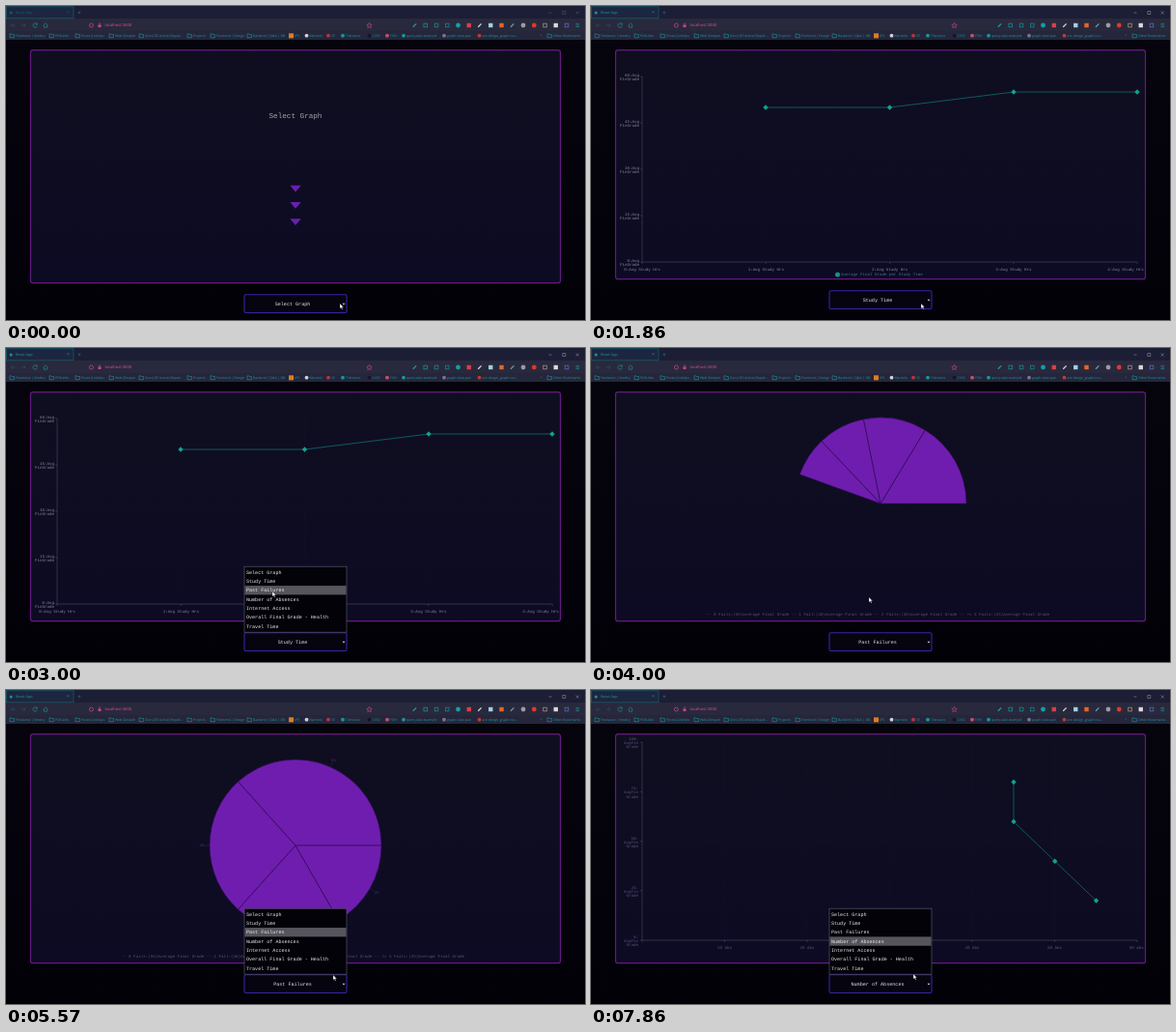
An HTML page that plays this animation: 600 px wide and 325 px high, repeating every 8000 ms.

```html
<!DOCTYPE html>
<html lang="en">
<head>
<meta charset="utf-8">
<title>Graph selector</title>
<style>
html, body { margin: 0; width: 100%; height: 100%; overflow: hidden; background: #030209; }
svg { display: block; width: 100%; height: 100%; }
text { white-space: pre; text-rendering: geometricPrecision; }
.mono { font-family: "Liberation Mono", "Courier New", monospace; }
.sans { font-family: "Open Sans", "Noto Sans", sans-serif; }
.grid { stroke: #1b1830; stroke-width: .4; stroke-dasharray: 1 1; fill: none; }
.axis { stroke: #4a4960; stroke-width: .6; fill: none; }
.line { stroke: #117a76; stroke-width: .7; fill: none; }
.icon { fill: none; stroke: #1c9a9e; stroke-width: .6; }
</style>
</head>
<body>
<svg id="stage" viewBox="0 0 600 325" preserveAspectRatio="none"></svg>
<script>
const FPS = 7, FRAMES = 56;
const OPTIONS = ['Select Graph', 'Study Time', 'Past Failures', 'Number of Absences',
  'Internet Access', 'Overall Final Grade - Health', 'Travel Time'];
const ROW = 9.33, LIST_TOP = 227.4;

const text = (x, y, str, size, fill, anchor = 'middle', font = 'mono') =>
  `<text class="${font}" x="${x}" y="${y + size * .3}" font-size="${size}" fill="${fill}" text-anchor="${anchor}">${str.replace(/&/g, '&amp;').replace(/>/g, '&gt;')}</text>`;
const rect = (x, y, w, h, attrs) => `<rect x="${x}" y="${y}" width="${w}" height="${h}" ${attrs}/>`;
const dot = (x, y, r, fill) => `<circle cx="${x}" cy="${y}" r="${r}" fill="${fill}"/>`;
const path = (d, attrs) => `<path d="${d}" ${attrs}/>`;
const range = n => [...Array(n).keys()];

function browser() {
  const teal = '#1f9a9f', pink = '#d24a8c';
  const label = (x, y, str, size = 3.45) => text(x, y, str, size, teal, 'start', 'sans');
  const folder = x => path(`M${x} 28.8h1.6l.6.7h2.2v3.2h-4.4z`, 'class="icon"');
  const folders = [[4, 'Freelance | Vendry'], [45, 'PCBuilds'], [72, 'Poses|LinkUps'], [107, 'Web|DevJam'],
    [138, 'Docs|DS Active|Ripple...'], [188, 'Projects'], [212, 'Frontend | Design'], [250, 'Backend | Q&A | DB'], [561, 'Other Bookmarks']];
  const links = [[295.5, 'VPS', '#e07a20'], [311.5, 'Marnelo', '#d0d0d8'], [334, 'SE', '#b8363c'], [349, 'Tilerow.io', '#14989a'],
    [376.5, 'CVCC', '#15152a'], [395, 'FISH', '#c8506c'], [412, 'query.take.example', '#14989a'],
    [454, 'graph-view-pan', '#77778c'], [490.5, 'ant design_graph-rou...', '#b83e32']];
  const tools = ['#1f9a9f', '#189092', '#1c868a', '#18808a', '#14a0a2', '#d84048', '#d8d8de', '#a0d0e0',
    '#e0682a', '#60a0b0', '#9a9aa4', '#e0382c', '#a09080', '#d8d8de', '#5a68b8', '#1f9a9f'];
  return rect(0, 0, 600, 35, 'fill="#25263b"') + rect(0, 0, 600, 13, 'fill="#1c1e36"')
    + rect(0, 13, 600, 13, 'fill="#29293e"')
    + rect(.4, .8, 69.6, 12, 'fill="#1d2640" stroke="#146a72" stroke-width=".6"')
    + '<g id="titlebar">' + dot(5.2, 7, 1.5, '#23909a') + label(10, 7, 'React App', 3.75)
    + text(64.5, 6.8, '×', 5, teal, 'middle', 'sans')
    + path('M562.5 7h3M576.8 5.5h3v3h-3zM590.7 5.5l3 3m0-3l-3 3', 'fill="none" stroke="#a0a0ac" stroke-width=".5"') + '</g>'
    + text(76, 6.8, '+', 6, teal, 'middle', 'sans')
    + path('M9.5 20h-4m1.7-1.7L5.5 20l1.7 1.7M16 20h4m-1.7-1.7L20 20l-1.7 1.7', 'class="icon" opacity=".4"')
    + path('M32 18.7a2.2 2.2 0 1 0 .3 2M32.3 17.6v1.6h-1.7M38.6 20l2.4-2.2 2.4 2.2M39.4 19.8v2.4h3.2v-2.4', 'class="icon"')
    + `<circle cx="88.4" cy="20" r="2" fill="none" stroke="${pink}" stroke-width=".7"/>`
    + rect(95.5, 19.5, 3, 2.4, `fill="${pink}"`) + path('M96.2 19.5v-1a.8.8 0 0 1 1.6 0v1', `fill="none" stroke="${pink}" stroke-width=".5"`)
    + text(102.5, 20, 'localhost:3000', 4.1, '#e0508f', 'start', 'sans')
    + path('M376.5 17.4l.8 1.8 1.9.2-1.4 1.3.4 1.9-1.7-1-1.7 1 .4-1.9-1.4-1.3 1.9-.2z', `fill="none" stroke="${pink}" stroke-width=".6"`)
    + tools.map((c, i) => {
        const x = 423.5 + i * 11.25;
        return i === 0 || i === 6 || i === 9 ? path(`M${x - 1.8} 21.8l3.4-3.4`, `stroke="${c}" stroke-width="1.3"`)
          : i === 4 || i === 10 || i === 11 ? dot(x, 20, 2.4, c)
          : i === 5 || i === 7 || i === 8 || i === 13 ? rect(x - 2.2, 17.8, 4.4, 4.4, `fill="${c}"`)
          : i === 15 ? path(`M${x - 1.8} 18.4h3.6m-3.6 1.6h3.6m-3.6 1.6h3.6`, 'class="icon"')
          : rect(x - 1.8, 18.2, 3.6, 3.6, `fill="none" stroke="${c}" stroke-width=".8"`);
      }).join('')
    + folders.map(([x, s]) => folder(x) + label(x + 6, 30.7, s)).join('')
    + links.map(([x, s, c], i) => (i ? dot(x, 30.7, 1.9, c) : rect(293, 28.3, 5, 5, `fill="${c}"`)) + label(x + 3, 30.7, s)).join('')
    + label(553.5, 30.3, '»');
}

const marker = ([x, y]) => path(`M${x - 2.7} ${y}L${x} ${y - 2.7}L${x + 2.7} ${y}L${x} ${y + 2.7}Z`, 'fill="#11a192"');

// xs, ys: tick positions; the first x and last y form the axes
function lineChart(id, xs, ys, points, labels) {
  const [left, right, top, bottom] = [xs[0], xs.at(-1), ys[0], ys.at(-1)];
  return `<g id="${id}">`
    + path(ys.map(y => `M${left} ${y}H${right}`).join('') + xs.map(x => `M${x} ${top}V${bottom}`).join(''), 'class="grid"')
    + path(`M${left} ${top}V${bottom}H${right}` + ys.map(y => `M${left - 2} ${y}h2`).join('') + xs.map(x => `M${x} ${bottom}v2`).join(''), 'class="axis"')
    + labels + path('M' + points.join('L'), 'class="line" pathLength="100"')
    + `<g class="dots">${points.map(marker).join('')}</g></g>`;
}

function studyChart() {
  const xs = range(5).map(i => 53 + i * 128.3), ys = range(5).map(i => 73 + i * 48);
  const gray = '#85859a';
  const labels = ys.map((y, i) => text(50, y - 1.2, `${60 - i * 15}:Avg`, 4.15, gray, 'end') + text(50, y + 3, 'FinGrade', 4.15, gray, 'end')).join('')
    + xs.map((x, i) => text(Math.min(x, 554), 272.3, `${i}:Avg Study Hrs`, 4.15, gray)).join('')
    + dot(255.5, 278, 2.5, '#129386') + text(259, 278, 'Average Final Grade per Study Time', 4.17, '#46708c', 'start');
  return lineChart('study', xs, ys, [[181, 105], [309.5, 105], [438, 89], [566, 89]], labels);
}

function absenceChart() {
  const xs = range(7).map(i => 53 + i * 85.5), ys = range(5).map(i => 54 + i * 51.25);
  const dim = '#56547a';
  const labels = ys.map((y, i) => [`${100 - i * 25}:`, 'AvgFin', 'Grade'].map((s, k) => text(49, y - 3.2 + k * 4.2, s, 4.15, dim, 'end')).join('')).join('')
    + xs.slice(1).map((x, i) => text(x - (i === 5 ? .8 : 0), 266.3, `${(i + 1) * 10} Abs`, 4.15, dim)).join('')
    + dot(262, 271.3, 2.5, '#129386') + text(265.3, 271.3, 'Avg Grade vs Num of Absences', 4.3, '#3b6a84', 'start');
  return lineChart('absence', xs, ys, [[438, 95.2], [438, 136.2], [480.7, 177.2], [523.5, 218]], labels);
}

const GRADES = [55, 40, 30, 25], TOTAL = 150, CENTER = [300, 161], RADIUS = 89;
const polar = (turn, r) => {
  const a = turn * 2 * Math.PI;
  return [CENTER[0] + r * Math.cos(a), CENTER[1] - r * Math.sin(a)];
};

function pieSlices(progress) {
  let from = 0;
  return GRADES.map(g => {
    const to = from + g / TOTAL * progress;
    const d = `M${CENTER}L${polar(from, RADIUS)}A${RADIUS} ${RADIUS} 0 0 0 ${polar(to, RADIUS)}Z`;
    from = to;
    return path(d, 'fill="#6f1dae" stroke="#2a0b52" stroke-width=".6"');
  }).join('');
}

function pieLabels() {
  let sum = 0;
  return GRADES.map(g => {
    const mid = (sum + g / 2) / TOTAL;
    sum += g;
    const [x, y] = polar(mid, 97);
    return path(`M${polar(mid, 89)}L${polar(mid, 94)}`, 'stroke="#3b1a66" stroke-width=".5"') + text(x, y, `${g}`, 4.15, '#4d2a80');
  }).join('');
}

const pieLegend = ['0 Fails', '1 Fail', '2 Fails', '>= 3 Fails']
  .map((s, i) => `-- ${s}:(${GRADES[i]})Average Final Grade`).join(' ');

const stage = document.getElementById('stage');
stage.innerHTML = `<defs>
  <linearGradient id="page" x2="0" y2="1"><stop stop-color="#06040d"/><stop offset="1" stop-color="#020108"/></linearGradient>
  <linearGradient id="panel" x2="0" y2="1"><stop stop-color="#0f0e20"/><stop offset="1" stop-color="#0d0b23"/></linearGradient></defs>`
  + rect(0, 0, 600, 325, 'fill="url(#page)"')
  + browser()
  + rect(25.5, 45.7, 549, 237, 'id="card" rx="2.5" fill="url(#panel)" stroke="#651a80" stroke-width="1.2"')
  + '<g id="intro">' + text(300, 114, 'Select Graph', 7.64, '#a3a3ae')
  + range(3).map(i => path(`M294.3 ${185.8 + i * 17.2}h11.4l-5.7 6.8z`, 'fill="#6a1fb0"')).join('') + '</g>'
  + studyChart() + absenceChart()
  + '<g id="pie"><g id="slices"></g><g id="pieLabels">' + pieLabels() + '</g>' + text(119.5, 276, pieLegend, 4.22, '#55536e', 'start') + '</g>'
  + '<g id="control">'
  + rect(247, 294.7, 106, 18.8, 'rx="1.5" fill="#06040f" stroke="#3b23a6" stroke-width="1.1"')
  + '<g id="choice"></g>' + path('M348.6 303.7h2.8l-1.4 1.7z', 'fill="#dcdce4"')
  + '<g id="list">' + rect(247, 226.2, 106, 68, 'fill="#030208" stroke="#55556a" stroke-width=".7"')
  + rect(247.4, 0, 105.2, ROW, 'id="highlight" fill="#56555d"')
  + OPTIONS.map((s, i) => text(249, LIST_TOP + ROW * (i + .5), s, 5.07, '#ececf0', 'start')).join('')
  + '</g></g>'
  + path('M0 0v5.2l1.2-1.1.9 2 .9-.4-.9-1.9h1.7z', 'id="cursor" fill="#fff" stroke="#111" stroke-width=".3"');

const el = id => document.getElementById(id);
const show = (node, on) => { node.style.display = on ? '' : 'none'; };

// frame, x, y
const CURSOR = [[0, 346, 308], [4, 346, 308], [7, 283, 246], [10, 283, 246], [13, 342, 308], [18, 342, 308],
  [21, 276, 252], [26, 277, 252], [28, 288, 258], [33, 320, 284], [37, 339, 295], [39, 339, 295],
  [44, 302, 257], [46, 302, 257], [51, 334, 294], [56, 334, 294]];
const SCENES = [[0, 'intro'], [10, 'study'], [26, 'pie'], [46, 'absence']];
const OPEN = [[4, 10], [18, 26], [39, 46], [54, 56]];

function cursorAt(f) {
  const i = CURSOR.findIndex(k => k[0] > f);
  const [a, b] = [CURSOR[i - 1], CURSOR[i]];
  const p = (f - a[0]) / (b[0] - a[0]), e = p * p * (3 - 2 * p);
  return [a[1] + (b[1] - a[1]) * e, a[2] + (b[2] - a[2]) * e];
}

function render(f) {
  const scene = SCENES.findLastIndex(s => f >= s[0]);
  const age = f - SCENES[scene][0];
  SCENES.forEach(([, id], i) => show(el(id), i === scene));

  const shift = scene ? 0 : 4;
  el('card').setAttribute('height', 237 + shift);
  el('control').setAttribute('transform', `translate(0 ${shift})`);
  el('titlebar').setAttribute('opacity', f < 4 ? .45 : 1);
  el('choice').innerHTML = text(297, 304, OPTIONS[scene], 5.1, '#e6e6ec');

  if (scene === 1 || scene === 3) {
    const chart = el(SCENES[scene][1]), line = chart.querySelector('.line');
    line.setAttribute('stroke-dasharray', age ? 'none' : '98.5 100');
    line.setAttribute('opacity', age ? 1 : .7);
    show(chart.querySelector('.dots'), age);
  }
  if (scene === 2) {
    const p = Math.min(1, Math.max(0, (age - .98) / 4));
    const swept = age >= 5 ? 1 : 1 - (1 - p) ** 2;
    el('slices').innerHTML = swept ? pieSlices(swept) : '';
    show(el('pieLabels'), swept === 1);
  }

  const [x, y] = cursorAt(f);
  const hovered = Math.floor((y - shift - LIST_TOP) / ROW);
  const row = hovered >= 0 && hovered < OPTIONS.length ? hovered : scene;
  show(el('list'), OPEN.some(([a, b]) => f >= a && f < b));
  el('highlight').setAttribute('y', LIST_TOP + row * ROW);
  el('cursor').setAttribute('transform', `translate(${x} ${y})`);
}

let last = -1;
function tick() {
  const f = Math.floor((performance.now() + 5) * FPS / 1000) % FRAMES;
  if (f !== last) render(last = f);
  requestAnimationFrame(tick);
}
tick();
</script>
</body>
</html>
```
